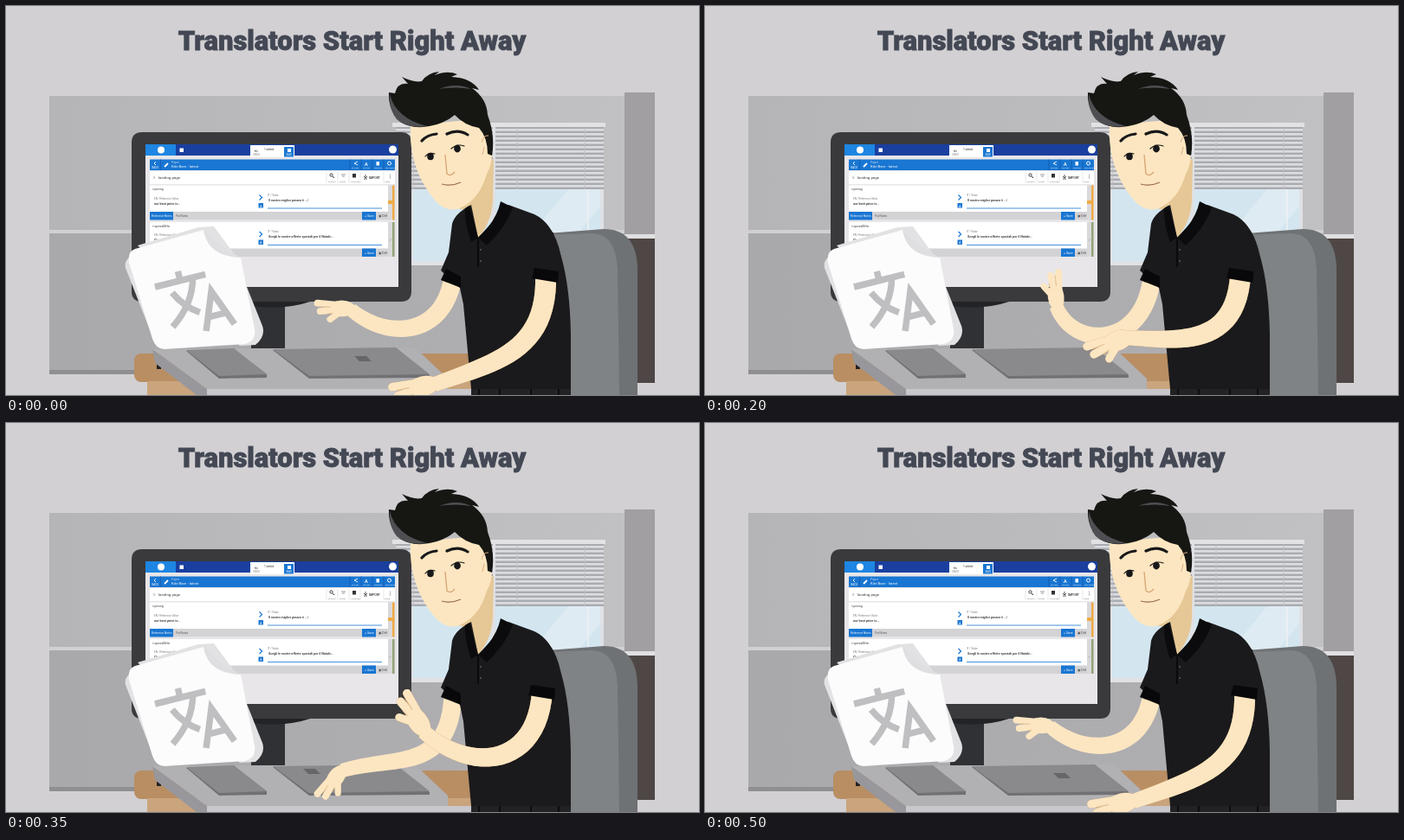
These frames come from a looping animation (800x450 px, 550 ms). An HTML page:

```html
<!DOCTYPE html>
<html lang="en">
<head>
<meta charset="utf-8">
<title>Translators Start Right Away</title>
<style>
html, body { margin: 0; width: 100%; height: 100%; overflow: hidden; background: #d2d0d3; }
svg { display: block; width: 100vw; height: 100vh; }
text { font-family: Roboto, Arial, sans-serif; }
#near { filter: drop-shadow(0 0 .5px #b98a55); }
</style>
</head>
<body>
<svg viewBox="0 0 800 450">
  <defs>
    <linearGradient id="wall" x2="1"><stop stop-color="#b5b4b6"/><stop offset="1" stop-color="#c1c0c2"/></linearGradient>
    <linearGradient id="low" x2="1"><stop stop-color="#a9a8ab"/><stop offset="1" stop-color="#b0afb2"/></linearGradient>
  </defs>
  <rect width="800" height="450" fill="#d2d0d3"/>
  <text x="399.5" y="51" font-size="31" font-weight="900" letter-spacing="-.06" text-anchor="middle" fill="#434854" stroke="#434854" stroke-width=".8">Translators Start Right Away</text>

  <!-- wall -->
  <path d="M50 104H714V260H50Z" fill="url(#wall)"/>
  <path d="M50 263H714V426H50Z" fill="url(#low)"/>
  <path d="M50 259H714V263H50Z" fill="#d0cfd1"/>
  <path d="M50 421H714V426H50Z" fill="#8f8e92"/>
  <path d="M714 100H749V436H714Z" fill="#a19fa1"/>
  <path d="M714 268H749V436H714Z" fill="#4e4745"/>
  <path d="M714 264H749V269H714Z" fill="#e0dfe1"/>

  <!-- window -->
  <path d="M466 139H690V300H466Z" fill="#dfe1e4"/>
  <path d="M470 145H559V295H470ZM565 145H686V295H565Z" fill="#d3e6f0"/>
  <path d="M580 295L655 205H686V232L634 295Z" fill="#dfebf2"/>
  <path d="M672 205V295" stroke="#eef2f5" stroke-width="1.5"/>
  <g id="blinds"></g>

  <!-- monitor -->
  <path d="M283 340H322V396H283Z" fill="#303135"/>
  <path d="M283 342H351Q322 352 283 347Z" fill="#222327"/>
  <path d="M157 146H456Q468 146 468 158V330Q468 342 456 342H157Q145 342 145 330V158Q145 146 157 146Z" fill="#3a3a3d"/>
  <path d="M161 160H453V325H161Z" fill="#e8e6e9"/>
  <g id="screen"></g>

  <!-- chair -->
  <path d="M625 263L690 258Q728 258 729 304V450H625Z" fill="#6f7274"/>
  <path d="M625 265L676 263Q704 263 706 304L708 450H625Z" fill="#808385"/>

  <!-- desk -->
  <rect x="148" y="402" width="400" height="33" rx="8" fill="#b98e63"/>
  <path d="M163 434H540V450H163Z" fill="#c9a47c"/>
  <path d="M174 410H179V420H174Z" fill="#222"/>
  <path d="M232 443H537V450H232Z" fill="#c9c7cb"/>
  <path d="M169 397L232 443V450H220L172 413Z" fill="#98979b"/>
  <path d="M169 397L472 395L510 431V443H232Z" fill="#b1b0b3"/>
  <path d="M208 399L263 397L301 426V430L246 431ZM308 398L450 396L489 427V430L350 431Z" fill="#717075"/>
  <path d="M208 398L263 396L301 426L246 428ZM308 397L450 395L489 426L350 428Z" fill="#8a898c"/>
  <path id="key" d="M0 0H14L20 6H6Z" fill="#66656a"/>

  <!-- papers -->
  <path d="M145 289Q136 294 138 303L165 372L178 385ZM152 277L222 256L240 255L262 285L296 370Q300 382 288 392L270 393Z" fill="#e2e2e4"/>
  <path d="M149 281L228 259Q234 288 271 291L287 374Q289 388 276 391L183 397Q173 397 169 385L142 297Q140 284 149 281Z" fill="#fcfcfd"/>
  <path d="M228 259Q233 290 271 291Q247 279 228 259Z" fill="#dfdfe1"/>
  <path transform="translate(172 325) rotate(-14) scale(3.75) translate(-1 -5)" fill="none" stroke="#bfbfc1" stroke-width="2"
    d="M1 5H17M9 2V5M13 5Q11 13 3.300 18.300M5.700 8Q8 13 12.500 16M13 22L17.500 10.500L22 22M14.800 18H20.200"/>

  <!-- far arm -->
  <g id="far"><path/><g></g></g>

  <!-- body -->
  <path d="M512 232L563 176L562 226Q560 252 545 268Q534 252 531 236Z" fill="#e6c896"/>
  <path d="M537 230Q518 240 515 252L511 285L502 306L524 326L528 345L537 443V450H652V380Q651 325 641 290Q633 252 610 241L580 230L545 268Z" fill="#1a1a1c"/>
  <path d="M508 304L525 313V326L502 317Z" fill="#08080a"/>
  <path d="M537 443H652V450H537Z" fill="#222225"/>
  <path d="M546 443V450M570 443V450M606 443V450M638 443V450" stroke="#0c0c0e" stroke-width="2"/>
  <path d="M535 231L545 268L537 273Q529 250 530 234ZM571 226L585 233Q577 256 555 277L545 268Q566 249 571 226Z" fill="#0b0b0d"/>
  <path d="M545 268V302" fill="none" stroke="#000" stroke-width="1.2"/>
  <circle cx="548" cy="282" r="1.1" fill="#55555a"/><circle cx="548" cy="295" r="1.1" fill="#55555a"/>

  <!-- head -->
  <path d="M467 138C465 174 477 202 493 222Q505 238 521 235Q546 226 555 194Q562 184 561 160L557 130Z" fill="#fce6c1"/>
  <path d="M456 134Q441 122 442 100L449 101Q452 88 464 90L457 82Q471 89 480 87Q487 77 500 76L495 80Q510 74 521 79L514 82Q537 83 546 97L538 95Q555 107 556 126Q565 150 561 173L556 171Q556 152 546 141Q529 138 518 126Q502 139 481 140Q465 141 456 134Z" fill="#161613"/>
  <path d="M443 102Q450 130 486 139Q462 142 451 131Q442 120 443 102ZM500 96Q520 88 537 96Q520 93 500 96Z" fill="#4f4f53"/>
  <path d="M557 150Q551 149 549 158M552 163L550 172" fill="none" stroke="#d9b084"/>
  <g fill="none" stroke="#18181a" stroke-linecap="round">
    <path d="M480 156Q486 149 497 148M509 148Q522 142 533 149" stroke-width="3.2"/>
    <path d="M484 174Q488 169 495 171M514 165Q521 159 529 162" stroke-width="1.2"/>
  </g>
  <ellipse cx="490" cy="174" rx="3.8" ry="4.3" fill="#18181a"/>
  <ellipse cx="521" cy="165" rx="3.9" ry="4.4" fill="#18181a"/>
  <path d="M507 172L509 194Q513 198 518 192" fill="none" stroke="#d9a878" stroke-width="1.4"/>
  <path d="M503 206Q514 209 525 204" fill="none" stroke="#9a6c50" stroke-width="1.2"/>

  <!-- near arm -->
  <g id="near"><path/><g></g></g>
  <g id="sleeve">
    <path d="M606 262L632 262L638 307L609 304Z" fill="#1a1a1c"/>
    <path d="M610 303L638 307L637 320L607 315Z" fill="#08080a"/>
  </g>
</svg>
<script>
const $ = id => document.getElementById(id);
const SKIN = "#fce6c1", BLUE = "#1976d2";

const box = (x, y, w, h, fill) => `<rect x="${x}" y="${y}" width="${w}" height="${h}" fill="${fill}"/>`;
const txt = (x, y, size, s, fill = "#333", weight = 400) =>
  `<text x="${x}" y="${y}" font-size="${size}" font-weight="${weight}" fill="${fill}">${s}</text>`;
const line = (d, color, w = 1) => `<path d="${d}" fill="none" stroke="${color}" stroke-width="${w}"/>`;

function blinds() {
  let s = box(446, 135, 246, 5, "#e2e2e5");
  for (const [x, w] of [[450, 112], [565, 125]]) {
    s += box(x, 140, w, 72, "#a9abb0");
    for (let y = 142; y < 211; y += 5) s += box(x, y, w, 2.6, "#dcdde0");
  }
  return s + line("M470 141V212M545 141V212M590 141V212M668 141V212", "#c0c0c3");
}

function card(y, key, ref, value, strip) {
  return box(166, y, 275, 40, "#fff") + box(441, y, 8, 40, "#d9d8da") + box(446, y, 2.5, 40, strip)
    + txt(169, y + 5.5, 3.3, "× " + key)
    + txt(171, y + 16, 3, "EN / Reference Value", "#777")
    + txt(171, y + 22, 3.8, ref, "#222", 500)
    + line(`M292.5 ${y + 11}l3 3l-3 3`, BLUE, 1.2)
    + box(291.5, y + 20.5, 5.5, 5.5, BLUE)
    + txt(293, y + 25, 4, "A", "#fff")
    + txt(302, y + 12, 3, "IT / Value", "#777")
    + txt(303, y + 18, 3.7, value, "#222", 500)
    + line(`M302 ${y + 26.5}H434`, BLUE, .8)
    + box(166, y + 30.5, 275, 9.5, "#d3d2d5")
    + box(411, y + 30.5, 16, 9.5, BLUE)
    + txt(414, y + 36.7, 3.6, "+ Save", "#fff")
    + txt(430, y + 36.7, 3.6, "▣ Diff", "#444");
}

function screen() {
  let s = box(161, 160, 292, 13, "#1a3f9f") + box(161, 160, 35, 13, "#1e86e2")
    + '<circle cx="179" cy="166.5" r="4" fill="#fff"/><circle cx="446.500" cy="166" r="4.500" fill="#fff"/>'
    + box(200.5, 164.5, 4.5, 4.5, "#fff") + box(282, 161, 51, 14, "#fff")
    + line("M287 168h4M287 168l1.500-1.500", "#555", .8)
    + txt(298, 167, 3.2, "1 added") + txt(285, 172.5, 3, "UNDO", "#888")
    + box(321, 163, 11, 11.5, BLUE) + box(325, 165, 4, 4, "#fff") + txt(323.5, 173, 2.7, "SAVE", "#fff")
    + box(166, 177.5, 283, 12.5, BLUE)
    + line("M178.500 177.500V190M397 177.500V190M410 177.500V190M423 177.500V190M436 177.500V190", "#1458ad", .7)
    + line("M173 180l-2 2l2 2", "#fff", .9) + txt(168.5, 188, 3, "BACK", "#fff")
    + line("M183 186l4-4", "#fff", 1.8)
    + txt(191, 181.5, 2.8, "Project", "#cfe2f7") + txt(191, 187, 4.3, "Kite Barn - latest", "#fff");
  s += line("M406 180l-4 2l4 2", "#fff", .9) + txt(414, 184.5, 5.5, "A", "#fff", 700)
    + box(427.5, 180, 3.5, 4.5, "#fff") + '<circle cx="442.500" cy="182" r="2" fill="none" stroke="#fff"/>';
  ["SHARE", "USAGE", "EXPORT", "SETTINGS"].forEach((l, i) => s += txt(399 + i * 13, 188.3, 2.5, l, "#fff"));
  s += box(166, 191, 283, 15, "#fff") + txt(170, 199.5, 4.5, "≡", "#777") + txt(176, 200, 4.4, "landing page", "#333")
    + line("M370 192V205M383 192V205M396 192V205M409 192V205M436 192V205", "#ddd", .7)
    + '<circle cx="375.500" cy="195.500" r="1.600" fill="none" stroke="#333"/>'
    + line("M377 197l2 2", "#333") + line("M387 195h5M388 197h3", "#999")
    + box(400, 194, 4, 4.5, "#333") + line("M415 195v4M413 197l2 2l2-2M413 200h4", "#333", .8)
    + txt(419, 200, 3.5, "IMPORT", "#333", 500) + txt(441, 199, 5, "⋮", "#333", 700);
  ["SEARCH", "FILTER", "COMPARE", "", "", "MORE"].forEach((l, i) => s += txt(372 + i * 13, 203.5, 2.3, l, "#666"));
  s += card(207.5, "pricing", "our best price is...", "Il nostro miglior prezzo è ...|", "#efaa45")
    + box(441, 225, 5, 4, "#efaa45")
    + box(166, 238, 27, 9.5, BLUE) + txt(168, 244.3, 3.2, "Reference Notes", "#fff") + txt(196, 244.3, 3.2, "Put Notes", "#555")
    + card(250, "specialOffer", "Choose our special offer", "Scegli le nostre offerte speciali per il Natale...", "#93a378")
    + txt(442, 272, 4.5, "✓", "#8a9a6e");
  return s;
}

$("blinds").innerHTML = blinds();
$("screen").innerHTML = screen();

const fingers = `<g fill="${SKIN}" stroke="${SKIN}" stroke-linecap="round">
  <ellipse cx="10" cy="1" rx="15" ry="9" stroke="none"/>
  <path d="M14 5L37 7" stroke-width="7.500"/><path d="M14 0L34 -2" stroke-width="7.500"/><path d="M12 -3L23 -11" stroke-width="7"/></g>
  <path d="M22 2.700L34 3M20 -4L26 -5" stroke="#dfb98a" stroke-width=".8" fill="none"/>`;
for (const id of ["far", "near"]) {
  $(id).children[0].setAttribute("fill", SKIN);
  $(id).children[1].innerHTML = fingers;
}

// step, shoulder x, two control points, wrist, hand angle
const far = [
  [0, 516, 505, 383, 440, 387, 398, 351, 180],
  [2, 516, 508, 388, 430, 397, 394, 343, 236],
  [3, 516, 508, 391, 428, 404, 399, 336, 268],
  [5, 516, 505, 403, 425, 390, 408, 363, 240],
  [7, 516, 512, 405, 450, 384, 388, 402, 126],
  [9, 516, 505, 390, 440, 377, 397, 370, 170]];
const near = [
  [0, 623, 626, 400, 565, 412, 494, 438, 166],
  [2, 621, 618, 405, 560, 398, 490, 418, 143],
  [3, 619, 615, 398, 555, 380, 488, 402, 136],
  [5, 618, 612, 392, 545, 398, 488, 368, 184],
  [7, 619, 614, 395, 540, 408, 482, 357, 236],
  [9, 622, 622, 402, 555, 415, 488, 406, 199]];

// cyclic Hermite curve through the keys
function pose(keys, u) {
  const n = keys.length;
  const at = i => {
    const k = keys[(i + n) % n];
    return [k[0] + 10 * Math.floor(i / n), ...k.slice(1)];
  };
  let i = n - 1;
  while (keys[i][0] > u) i--;
  const [a, b, c, d] = [at(i - 1), at(i), at(i + 1), at(i + 2)];
  const h = c[0] - b[0], s = (u - b[0]) / h, s2 = s * s, s3 = s2 * s;
  return b.slice(1).map((p, j) => {
    const q = c[j + 1];
    const m0 = (q - a[j + 1]) / (c[0] - a[0]) * h;
    const m1 = (d[j + 1] - p) / (d[0] - b[0]) * h;
    return (2 * s3 - 3 * s2 + 1) * p + (s3 - 2 * s2 + s) * m0 + (3 * s2 - 2 * s3) * q + (s3 - s2) * m1;
  });
}

function drawArm(id, p, y0, w0, w1, scale) {
  const [x0, x1, y1, x2, y2, x3, y3, angle] = p;
  const cubic = (a, b, c, d, t) => {
    const r = 1 - t;
    return [r * r * r * a + 3 * r * r * t * b + 3 * r * t * t * c + t * t * t * d,
            r * r * (b - a) + 2 * r * t * (c - b) + t * t * (d - c)];
  };
  const left = [], right = [];
  for (let k = 0; k <= 24; k++) {
    const t = k / 24;
    const [x, dx] = cubic(x0, x1, x2, x3, t), [y, dy] = cubic(y0, y1, y2, y3, t);
    const w = (w0 + (w1 - w0) * t * t) / 2 / Math.hypot(dx, dy);
    left.push([x - dy * w, y + dx * w].map(v => v.toFixed(2)));
    right.unshift([x + dy * w, y - dx * w].map(v => v.toFixed(2)));
  }
  const [arm, hand] = $(id).children;
  arm.setAttribute("d", "M" + left.concat(right).join("L") + "Z");
  hand.setAttribute("transform", `translate(${x3} ${y3}) rotate(${angle}) scale(${scale})`);
}

function draw(ms) {
  const u = Math.floor(ms % 550 / 50) % 10;
  const p = pose(near, u);
  drawArm("far", pose(far, u), 314, 21, 16, 1.04);
  drawArm("near", p, 310, 24, 17, 1.28);
  $("sleeve").setAttribute("transform", `translate(${p[0] - 623} 0)`);
  const pressed = u === 0 || u >= 5 && u <= 7;
  $("key").setAttribute("visibility", pressed ? "visible" : "hidden");
  $("key").setAttribute("transform", u ? "translate(343 400)" : "translate(402 405)");
}

const start = performance.now();
function tick() {
  draw(performance.now() - start);
  requestAnimationFrame(tick);
}
tick();
</script>
</body>
</html>
```
